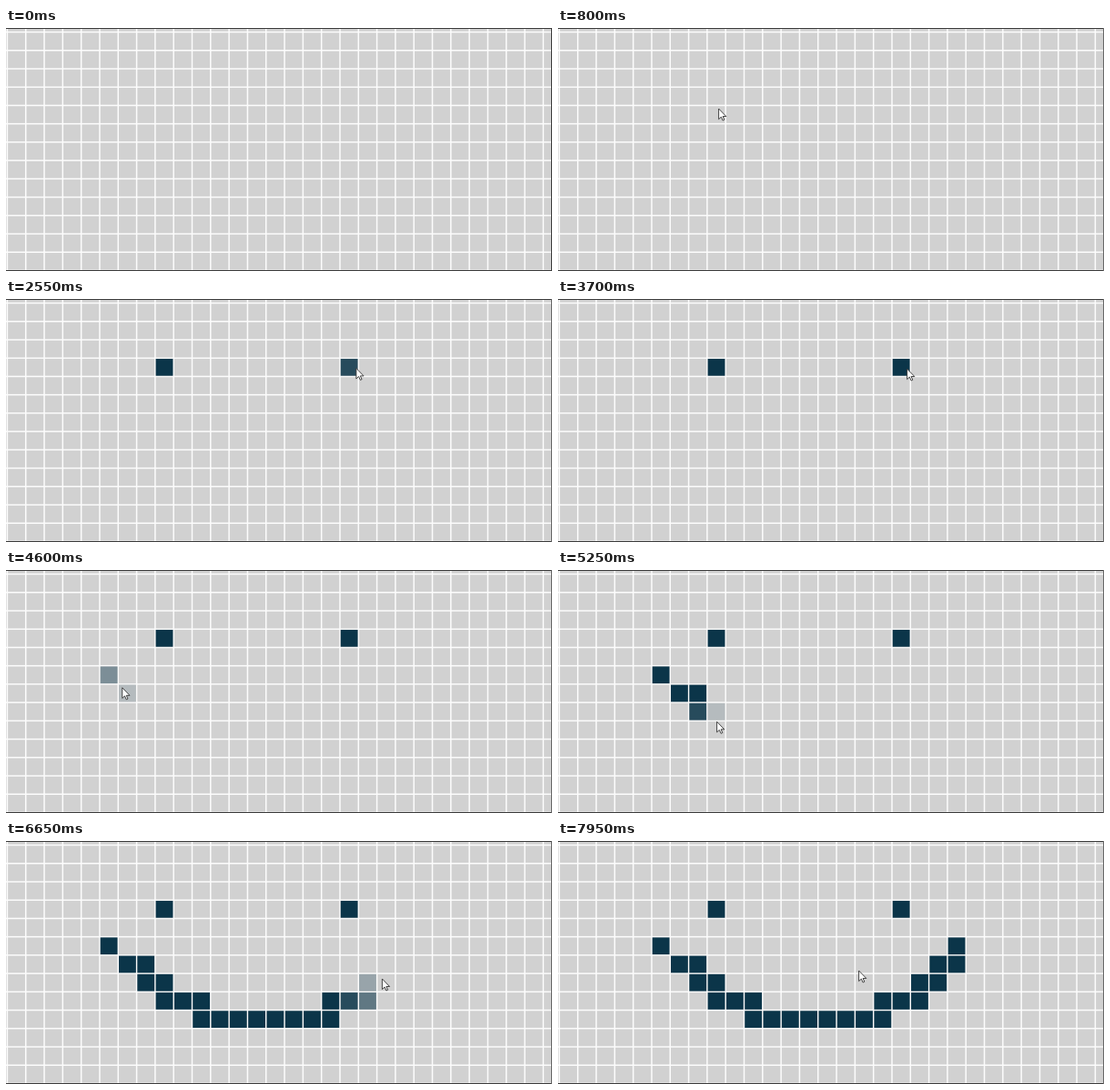
Animation, 600 px wide and 268 px high, one loop 8 s. Source, as an HTML page with a canvas:

```html
<!DOCTYPE html>
<html lang="en">
<head>
<meta charset="utf-8">
<title>Pixel smile</title>
<style>
html, body { margin: 0; width: 100%; height: 100%; overflow: hidden; background: #d1d1d1; }
canvas { display: block; }
</style>
</head>
<body>
<canvas id="stage" width="600" height="268"></canvas>
<script>
const ctx = document.getElementById('stage').getContext('2d');
const W = 600, H = 268, LOOP = 8000, STEP = 50, FADE = 350;
const X0 = 1.4, Y0 = 4.5, PX = 20.31, PY = 20.23, LINE = 1.5;
const GREY = [209, 209, 209], INK = [11, 53, 73];

// Key points of the pointer: time, x, y
const path = [
  [250, 615, 150], [800, 177, 89], [1050, 177, 80], [1150, 177, 80],
  [1900, 386, 76], [3700, 384, 77],
  [4340, 113, 117.64], [5180, 162, 157], [5250, 175, 167.3], [5600, 220, 191],
  [6230, 345, 190.5], [6450, 388, 176], [6650, 413.8, 152], [6950, 437, 122],
  [7700, 331, 143]
];
// Times when the button is held: two dots, then the smile
const presses = [[1100, 1150], [2250, 2300], [4450, 6950]];

const mix = (a, b, k) => a + (b - a) * k;

function pointer(t) {
  const i = path.findIndex(p => p[0] > t);
  if (i < 0) return path[path.length - 1].slice(1);
  if (i === 0) return path[0].slice(1);
  const [t0, x0, y0] = path[i - 1], [t1, x1, y1] = path[i];
  const k = (t - t0) / (t1 - t0);
  return [mix(x0, x1, k), mix(y0, y1, k)];
}

// Every cell the pressed pointer touches, with the time it was first touched
const cells = new Map();
for (const [from, to] of presses) {
  for (let t = from; t <= to; t += STEP) {
    const [x, y] = pointer(t);
    const c = Math.floor((x - X0) / PX), r = Math.floor((y - Y0) / PY);
    const key = c + ',' + r;
    if (!cells.has(key)) cells.set(key, { c, r, t });
  }
}

function drawGrid() {
  ctx.fillStyle = `rgb(${GREY})`;
  ctx.fillRect(0, 0, W, H);
  ctx.fillStyle = '#fcfcfc';
  for (let x = X0; x < W; x += PX) ctx.fillRect(x - LINE / 2, 0, LINE, H);
  for (let y = Y0; y < H; y += PY) ctx.fillRect(0, y - LINE / 2, W, LINE);
}

function drawCells(t) {
  for (const cell of cells.values()) {
    const k = Math.min(1, (t - cell.t) / FADE);
    if (k <= 0) continue;
    ctx.fillStyle = `rgb(${GREY.map((g, i) => Math.round(mix(g, INK[i], k)))})`;
    ctx.fillRect(X0 + cell.c * PX + LINE / 2, Y0 + cell.r * PY + LINE / 2, PX - LINE, PY - LINE);
  }
}

function drawEdges(t) {
  ctx.fillStyle = '#3a3a3a';
  ctx.fillRect(0, 0, W, 1);
  ctx.fillRect(0, H - 1, W, 1);
  ctx.fillStyle = t < STEP ? '#3a3a3a' : '#666';
  ctx.fillRect(W - 1, 0, 1, H);
}

const arrow = new Path2D('M0 0V11.6L2.7 9.1L4.5 13L6.2 12.2L4.5 8.5H8.2Z');

function drawPointer(t) {
  const [x, y] = pointer(t);
  ctx.save();
  ctx.translate(x - 0.4, y);
  ctx.fillStyle = '#fff';
  ctx.strokeStyle = '#333';
  ctx.lineWidth = 0.9;
  ctx.lineJoin = 'round';
  ctx.fill(arrow);
  ctx.stroke(arrow);
  ctx.restore();
}

const start = performance.now();

function frame(now) {
  const t = Math.floor((Math.max(0, now - start) % LOOP) / STEP) * STEP;
  drawGrid();
  drawCells(t);
  drawEdges(t);
  drawPointer(t);
  requestAnimationFrame(frame);
}
frame(start);
</script>
</body>
</html>
```
